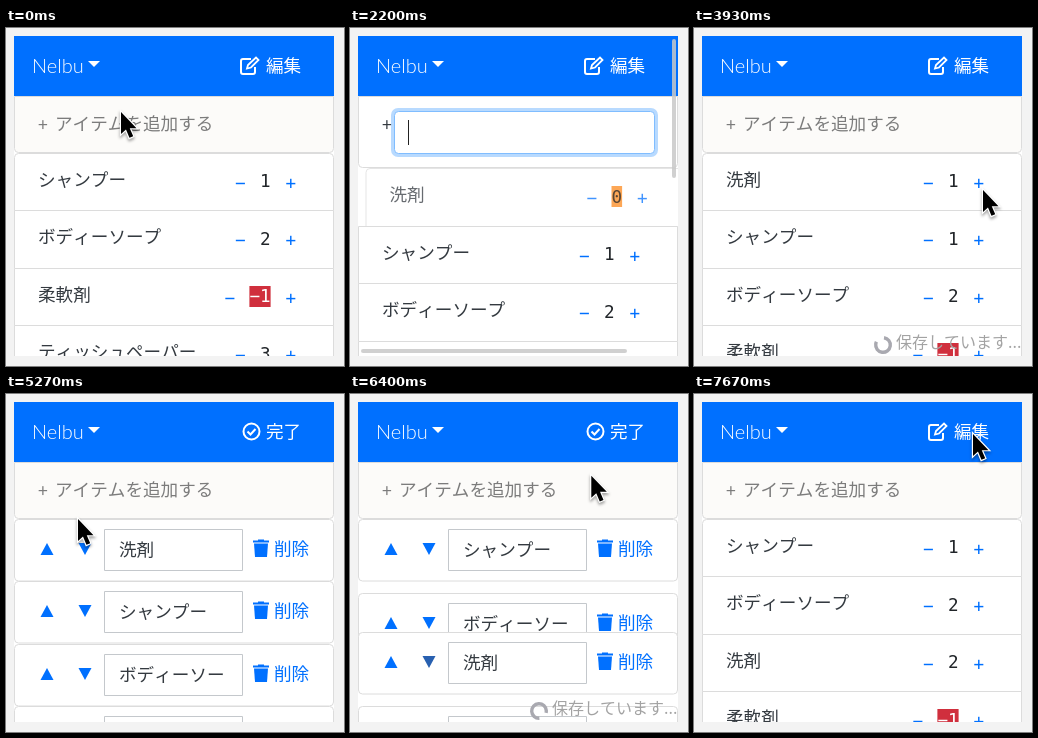
An HTML page with a canvas that plays this animation: 338 px wide and 338 px high, repeating every 8 s.

```html
<!DOCTYPE html>
<html lang="ja">
<head>
<meta charset="utf-8">
<style>
  html, body { margin: 0; width: 100%; height: 100%; overflow: hidden; background: #f3f3f3; }
  canvas { display: block; }
</style>
</head>
<body>
<canvas id="stage" width="338" height="338"></canvas>
<script>
const ctx = document.getElementById('stage').getContext('2d');
const LOOP = 8000;
const JP = '"Noto Sans CJK JP", "Noto Sans CJK", sans-serif';
const MONO = '"DejaVu Sans Mono", monospace';
const BLUE = '#0070ff', INK = '#343a40', LINE = '#dcdcdc';
const SIZE = 17.6, DIGIT = 10.6;

// Moments of the story, in ms
const OPEN = 400, TYPE = 800, CONVERT = 1600, ADD = 1930, MOUSE = 3470,
  PLUS1 = 3730, PLUS2 = 4070, EDIT = 4600, DOWN1 = 5600, DOWN2 = 6150, DONE = 6670;
const SAVING = [[2430, 3200], [3800, 4800], [6070, 7400]];
const TYPING = [[800, 's'], [870, 'せ'], [1000, 'せn'], [1070, 'せん'], [1130, 'せんz'],
  [1270, 'せんざ'], [1400, 'せんざい'], [CONVERT, '洗剤'], [ADD, '']];
const POINTER = [[0, 115, 84], [MOUSE, 115, 84], [3700, 289, 162], [4270, 289, 162],
  [4530, 280, 42], [4800, 280, 42], [5130, 157, 107], [5270, 72, 125], [5470, 72, 125],
  [5600, 78, 154], [5850, 78, 154], [6050, 78, 216], [6170, 78, 216], [6400, 241, 82],
  [6530, 279, 40], [LOOP, 279, 40]];

const clamp = v => Math.min(1, Math.max(0, v));
const progress = (t, start, length) => clamp((t - start) / length);

// CSS "ease" timing curve
function ease(p) {
  let lo = 0, hi = 1, s = .5;
  for (let i = 0; i < 20; i++) {
    s = (lo + hi) / 2;
    if (.75 * s * (1 - s) + s ** 3 < p) lo = s; else hi = s;
  }
  return .3 * s * (1 - s) ** 2 + 3 * s * s * (1 - s) + s ** 3;
}

function text(str, x, y, color = INK, size = SIZE, family = JP, weight = 400) {
  ctx.font = `${weight} ${size}px ${family}`;
  ctx.fillStyle = color;
  ctx.fillText(str, x, y);
}

function rect(x, y, w, h, color) {
  ctx.fillStyle = color;
  ctx.fillRect(x, y, w, h);
}

function box(x, y, w, h, radius, fill, stroke = LINE, width = 1) {
  ctx.beginPath();
  ctx.roundRect(x, y, w, h, radius);
  ctx.fillStyle = fill;
  ctx.fill();
  ctx.strokeStyle = stroke;
  ctx.lineWidth = width;
  ctx.stroke();
}

function polygon(points, color) {
  ctx.beginPath();
  points.forEach(p => ctx.lineTo(...p));
  ctx.closePath();
  ctx.fillStyle = color;
  ctx.fill();
}

function strokePath(d, color, width) {
  ctx.strokeStyle = color;
  ctx.lineWidth = width;
  ctx.stroke(new Path2D(d));
}

function header(editing) {
  rect(8, 8, 320, 60, BLUE);
  text('Nelbu', 26, 45, '#fff', 20, 'Lato, sans-serif', 300);
  polygon([[82, 33], [94, 33], [88, 39]], '#fff');
  if (editing) {
    strokePath('M253.5 37.5a8 8 0 1 1-16 0a8 8 0 1 1 16 0M241.5 37.5l3 3l5-5.5', '#fff', 2);
  } else {
    strokePath('M245 31H237q-2 0-2 2V44q0 2 2 2H247q2 0 2-2V39', '#fff', 2);
    strokePath('M241 40.5L242 37L250 29.5L252.5 32L245 39.5Z', '#fff', 1.8);
  }
  text(editing ? '完了' : '編集', 260, 43.5, '#fff');
}

function addRow(t, open) {
  box(8.5, 68.5, 319, open ? 71 : 56, [0, 0, 4, 4], open ? '#fff' : '#fcfbf9');
  text('+', 32, 102.5, open ? INK : '#7c7c7c');
  if (!open) return text('アイテムを追加する', 49, 102, '#7c7c7c');

  const focus = progress(t, OPEN, 200);
  box(44, 83, 261, 43, 4, '#fff', `rgba(0,123,255,${.28 * focus})`, 6);
  box(44.5, 83.5, 260, 42, 4, '#fff', '#80bdff');
  const typed = TYPING.reduce((str, [at, next]) => t >= at ? next : str, '');
  text(typed, 58, 110.5, '#495057');
  const caret = Math.round(58 + ctx.measureText(typed).width);
  if (t < ADD || (t - ADD) % 1000 < 500) rect(caret, 92, 1, 25, '#222');
}

function suggestions() {
  ctx.save();
  ctx.shadowColor = 'rgba(0,0,0,.35)';
  ctx.shadowBlur = 16;
  ctx.shadowOffsetY = 5;
  rect(54, 117, 116, 75, '#fff');
  ctx.restore();
  box(54.5, 117.5, 115, 74, 0, '#fff', '#8a8a8a');
  ['洗剤', '洗剤が', '洗剤が安いと'].forEach((word, i) =>
    text(word, 58, 133 + 18 * i, '#000', 12.9, JP, 500));
  rect(55, 172, 114, 1, '#444');
  text('Tabキーで選択', 59, 189, '#000', 12.9, JP, 500);
}

function countRow({ name, count }, top, first) {
  const y = Math.round(top);
  box(8.5, y + .5, 319, 58, first ? [4, 4, 0, 0] : 0, '#fff');
  text(name, 32, top + 33);
  const label = String(count).replace('-', '−');
  const width = label.length * DIGIT, x = 264.6 - width;
  if (count < 1) rect(x, y + 18, width, 21, count < 0 ? '#d02f3d' : '#fd8a1e');
  text(label, x, top + 34.5, count < 0 ? '#fff' : '#212529', SIZE, MONO);
  text('−', x - 25, top + 36, BLUE, SIZE, MONO);
  text('+', 279.5, top + 36, BLUE, SIZE, MONO);
}

function editRow({ name }, top, pressed) {
  ctx.save();
  ctx.translate(0, Math.round(top));
  box(8.5, .5, 319, 61.5, 4, '#fff');
  polygon([[34.5, 36], [47.5, 36], [41, 24]], BLUE);
  polygon([[72.5, 24], [85.5, 24], [79, 36]], pressed ? '#2860b0' : BLUE);
  box(98.5, 10.5, 138, 41, 0, '#fff', '#c4c8cc');
  rect(247, 21.5, 16, 2, BLUE);
  rect(252, 20.5, 6, 2, BLUE);
  polygon([[248, 24.5], [262, 24.5], [261, 38], [249, 38]], BLUE);
  text('削除', 268, 36, BLUE);
  ctx.beginPath();
  ctx.rect(113, 11, 107, 40);
  ctx.clip();
  text(name, 113, 37);
  ctx.restore();
}

function list(t, open, editing) {
  const first = ease(progress(t, DOWN1, 500)), second = ease(progress(t, DOWN2, 500));
  const added = t >= ADD;
  const items = [
    { name: 'シャンプー', count: 1, rank: 1 - first },
    { name: 'ボディーソープ', count: 2, rank: 2 - second },
    { name: '柔軟剤', count: -1, rank: 3 },
    { name: 'ティッシュペーパー', count: 3, rank: 4 },
  ];
  if (added) items.push({
    name: '洗剤', count: (t >= PLUS1) + (t >= PLUS2), rank: first + second, fresh: true,
  });
  // While editing, the moving card stays on top
  if (!editing) items.sort((a, b) => a.rank - b.rank);
  const start = open ? 140 : 124.6;
  for (const item of items) {
    const rank = item.rank - !added;
    if (editing) {
      editRow(item, start + 62.6 * rank, item.fresh && t >= DOWN1);
      continue;
    }
    const enter = item.fresh ? ease(progress(t, ADD, 600)) : 1;
    ctx.save();
    ctx.globalAlpha = enter;
    ctx.translate(30 * (1 - enter), 0);
    countRow(item, start + 57.6 * rank, rank < .5);
    ctx.restore();
  }
}

function scrollbars(t) {
  if (t < ADD + 60 || t > 3200) return;
  const bar = (x, y, w, h) => {
    ctx.beginPath();
    ctx.roundRect(x, y, w, h, 2);
    ctx.fill();
  };
  ctx.save();
  ctx.fillStyle = 'rgba(200,200,200,.85)';
  if (t < ADD + 600) bar(11, 321, 266, 4);
  ctx.globalAlpha = 1 - progress(t, 2730, 400);
  bar(322, 11, 4, 139);
  ctx.restore();
}

function savingNote(t) {
  if (!SAVING.some(([from, to]) => t >= from && t < to)) return;
  const turn = t / 1000 * 2 * Math.PI - 1;
  ctx.beginPath();
  ctx.arc(189, 317, 7.3, turn, turn + 1.6 * Math.PI);
  ctx.strokeStyle = '#a9a9b0';
  ctx.lineWidth = 3.4;
  ctx.stroke();
  text('保存しています...', 202, 319.5, '#a3a3a3', 16);
}

function pointer(t) {
  if (t >= TYPE && t < MOUSE) return;
  const i = POINTER.findIndex(([at]) => at > t);
  const [t0, x0, y0] = POINTER[i - 1], [t1, x1, y1] = POINTER[i];
  const p = (t - t0) / (t1 - t0);
  ctx.save();
  ctx.translate(x0 + (x1 - x0) * p, y0 + (y1 - y0) * p);
  ctx.scale(.94, .94);
  const arrow = new Path2D('M0 0V23.5L5.3 18.6L9 27.5L13 25.8L9.3 17.2H16.5Z');
  ctx.shadowColor = 'rgba(0,0,0,.4)';
  ctx.shadowBlur = 3;
  ctx.shadowOffsetY = 2;
  ctx.strokeStyle = '#fff';
  ctx.lineWidth = 2.5;
  ctx.stroke(arrow);
  ctx.shadowColor = 'transparent';
  ctx.fillStyle = '#000';
  ctx.fill(arrow);
  ctx.restore();
}

function draw(now) {
  const t = now % LOOP;
  const open = t >= OPEN && t < PLUS1;
  const editing = t >= EDIT && t < DONE;
  rect(0, 0, 338, 338, '#f3f3f3');
  ctx.save();
  ctx.beginPath();
  ctx.rect(8, 8, 320, 320);
  ctx.clip();
  rect(8, 8, 320, 320, '#fff');
  list(t, open, editing);
  addRow(t, open);
  header(editing);
  scrollbars(t);
  savingNote(t);
  ctx.restore();
  if (t >= 1070 && t < CONVERT) suggestions();
  pointer(t);
}

const begin = performance.now();
(function frame() {
  draw(performance.now() - begin);
  requestAnimationFrame(frame);
})();
</script>
</body>
</html>
```
